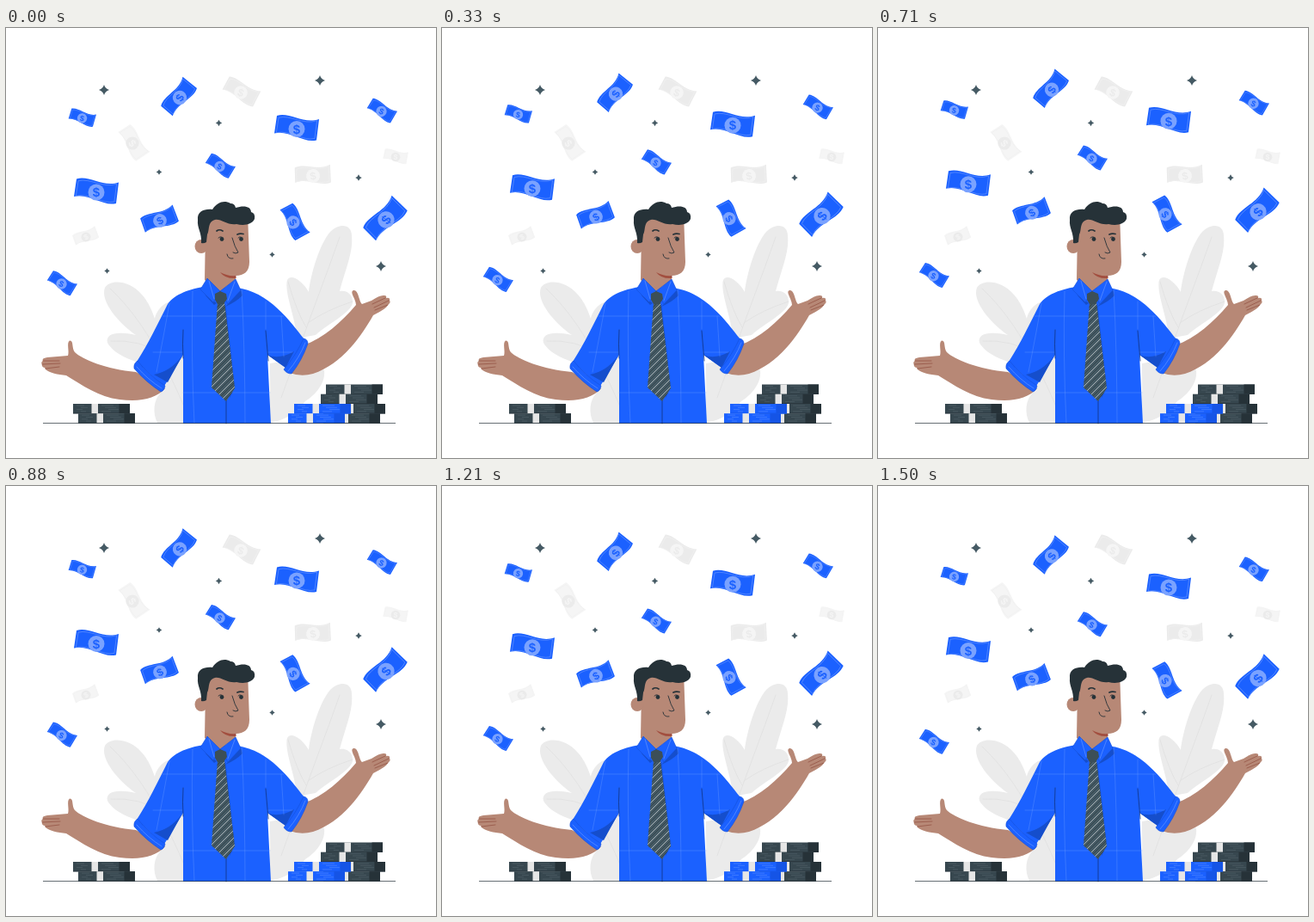
An HTML page that plays this animation: 500x500 px, repeating every 1.54 s.

```html
<!DOCTYPE html>
<html lang="en">
<head>
<meta charset="utf-8">
<title>Money rain</title>
<style>
html, body { margin: 0; width: 100%; height: 100%; overflow: hidden; background: #fff; }
svg { display: block; width: 100vw; height: 100vh; }
text { font: 700 15px "Liberation Sans", Arial, sans-serif; text-anchor: middle; }
.line { fill: none; stroke-linecap: round; stroke-linejoin: round; }
</style>
</head>
<body>
<svg viewBox="0 0 500 500">
  <g fill="#ebebeb">
    <path d="M338 361C338 340 323 308 327 293C331 285 345 294 352 307C354 288 364 252 377 237C387 227 402 227 402 242C404 260 395 280 388 306C397 304 404 311 403 320C400 332 374 344 360 357Z"/>
    <path d="M307 459V390L345 384L370 398C372 414 358 428 348 434C338 447 325 456 307 459Z"/>
    <path d="M207 459H176C170 447 172 433 179 425L150 401L171 393C153 390 126 381 118 366C115 355 130 352 151 357C132 344 109 318 115 302C121 291 145 294 157 309C166 318 171 332 173 338C175 328 184 318 194 318L215 400Z"/>
  </g>
  <g class="line" stroke="#e0e0e0" stroke-width=".8">
    <path d="M388 243C373 286 352 340 320 430M328 295Q338 330 349 348M403 318Q372 328 351 343"/>
    <path d="M121 303C150 330 177 370 207 440M122 364Q155 362 183 379M187 326Q177 342 175 359"/>
  </g>
  <g id="pale"></g>
  <g id="stars" fill="#455a64"></g>
  <g id="bills"></g>

  <g fill="#b78876">
    <path d="M185 419C174 431 157 435 132 432C108 429 88 415 70 404C60 403 51 401 46 397L45 395Q41 394 42 391Q40 389 43 387Q41 384 48 383L72 381C74 376 70 366 74 363.500C79 363 76 372 80 377C88 385 117 397 151 400Z"/>
    <path d="M346 369C370 360 390 342 407 322C407 315 399 307 404 305C410 304 410 317 414 321L425 317Q435 310 440 311Q443 311 442 314Q447 313 446 317Q448 319 444 322Q443 326 427 334C414 357 391 391 357 402Q343 406 330 401Z"/>
  </g>
  <g class="line" stroke="#995b4b" stroke-width=".9">
    <path d="M43 387L62 387M42 391L63 390M46 396L62 394M426 321L441 314M428 325L445 317M429 328L444 322"/>
  </g>

  <path fill="#1b61ff" d="M230 301C211 304 193 311 187 323C177 343 165 368 152 388L183 418L206 380L206 460H308L304 380L328 397L347 362C330 341 306 306 267 302Z"/>
  <g fill="#154ecc">
    <path d="M172 403Q192 399 205 381L188 412Z"/>
    <path d="M304 380Q317 386 335 376L325 395Z"/>
    <path d="M258 321L273 304L275 311Q267 319 255 324ZM231 310L245 320L242 322Z"/>
  </g>
  <path class="line" stroke="#6f9cff" stroke-width=".6" opacity=".6" d="M182 335H323M171 377H205M304 377H333M206 424H307M217 306Q215 380 219 460M274 303Q278 380 278 460M302 318V350M190 320Q184 355 175 400M320 335L323 382"/>
  <path class="line" stroke="#12347f" stroke-width=".8" d="M206 351Q205 368 206 384M302 352L305 387M256 430V460"/>
  <g fill="#1b61ff" stroke="#1550d8" stroke-width=".6">
    <path d="M153 387Q148 390 149 396Q163 412 180 423Q184 422 185 416Q166 404 153 387Z"/>
    <path d="M346 361Q351 362 351 367Q344 387 332 402Q326 402 323 397Q337 381 346 361Z"/>
  </g>
  <path class="line" stroke="#6f9cff" stroke-width=".6" d="M152 394Q165 409 181 419M348 366Q341 384 328 399"/>

  <path fill="#b78876" d="M232 235L231 293L249 306L267 293V288C277 288 283 283 283 272L281 215H238Z"/>
  <ellipse cx="227" cy="254" rx="7.500" ry="8" fill="#b78876"/>
  <path fill="#a24e3f" d="M249 284Q258 289 267.500 288V291Q255 292 249 284Z"/>
  <path fill="#263238" d="M227 250C228 238 222 233 223 223C222 213 231 210 240 211C246 202 254 200 261 204Q266 204 267 209C276 206 285 207 285 214Q290 215 289 222C286 229 276 230 268 228C258 230 249 221 243 223C234 225 237 236 234 240L233 249Q230 251 227 250Z"/>
  <g fill="#263238"><circle cx="251" cy="245.500" r="2.400"/><circle cx="273.500" cy="245.500" r="2.400"/></g>
  <g class="line" stroke="#263238">
    <path stroke-width="1.700" d="M245 236Q248 233.500 252 236M269 240Q272 238.500 276 239.500"/>
    <path stroke-width=".9" d="M247 244Q249 242 251 243M270 244Q271 242.500 273 243M263 244Q266 255 270 261Q267 263 264 261M257 263Q258 269 264 268"/>
  </g>

  <path fill="#154ecc" d="M255 320L266 418L260 430L250 340Z"/>
  <g fill="#1b61ff" stroke="#1550d8" stroke-width=".6">
    <path d="M234 291L226 304L241 319L249 306Z"/>
    <path d="M267 292L273 305L258 321L249 306Z"/>
  </g>
  <path class="line" stroke="#6f9cff" stroke-width=".6" d="M236 294L242 315M266 295L258 317"/>
  <clipPath id="blade"><path d="M246 319L254 319L266 419L256 434L239 418Z"/></clipPath>
  <g clip-path="url(#blade)">
    <rect x="235" y="315" width="35" height="120" fill="#455a64"/>
    <g id="stripes"></g>
  </g>
  <path fill="#3c4f58" d="M243 309L249 306L256 309L257 315L253 321H246L243 316Z"/>

  <g id="stacks"></g>
  <path stroke="#263238" stroke-width=".7" d="M43 459.500H453"/>
</svg>
<script>
const $ = id => document.getElementById(id);
const fill = (id, parts) => { $(id).innerHTML = parts.join(''); };

// Bills: x, y of the coin, turn in degrees, size
const BLUE = [
  [88.5, 105, 9, 0.6], [202, 81, -58, 0.86], [338, 117.5, 0, 1],
  [436.5, 97, 23, 0.65], [248.5, 161, 24, 0.65], [105, 191, 0, 1],
  [179, 224, -28, 0.83], [334, 226, 54, 0.8], [442, 223, -53, 1.02],
  [64.5, 297.5, 24, 0.65]
];
const GREY = [[273, 75, 20, 0.82], [357, 172, -10, 0.84]];
const FAINT = [[147, 134, 49, 0.8], [453, 150, 3, 0.56], [93, 243, -28, 0.58]];
// Sparkles: x, y, radius
const STARS = [
  [114, 72, 6], [365, 61, 6], [436, 277, 6], [247.5, 110.5, 3.7],
  [178, 167.5, 3.3], [410, 174, 3.8], [309.5, 263.5, 3.2], [117.5, 282.5, 3.2]
];
const NOTE = 'M-23-15.500C-8-20 8-5 26-11.500L23 13C8 17-8 1-26 5Z';

const bill = (paper, coin, edge) => ([x, y, turn, size]) =>
  `<g transform="translate(${x} ${y}) rotate(${turn}) scale(${size})">
    <path d="${NOTE}" fill="${paper}"/>
    <path d="${NOTE}" transform="scale(.91 .85)" fill="none" stroke="${edge}" stroke-width=".7"/>
    <circle r="9.500" fill="${coin}"/>
    <text y="5.300" fill="${paper}">$</text></g>`;

function star([x, y, r]) {
  const k = r * 0.23;
  return `<path transform="translate(${x} ${y})" d="M0 ${-r}Q${k} ${-k} ${r} 0` +
    `Q${k} ${k} 0 ${r}Q${-k} ${k} ${-r} 0Q${-k} ${-k} 0 ${-r}Z"/>`;
}

const DARK = ['#37474f', '#263238', '#607078'];
const BRIGHT = ['#1b61ff', '#1554e6', '#6f9cff'];

function bundle(x, y, [front, side, line]) {
  let lines = '';
  for (let i = 0; i < 4; i++) {
    const ly = 2 + i * 2.3;
    lines += `M${4 + i % 2 * 5} ${ly}h${9 - i}M${33 + i % 3 * 4} ${ly}h${14 - i}`;
  }
  return `<g transform="translate(${x} ${y})">
    <rect width="66" height="11.300" fill="${front}"/>
    <rect x="53.500" width="12.500" height="11.300" fill="${side}"/>
    <path d="M0 11H66" stroke="${side}" stroke-width=".8"/>
    <path d="${lines}" stroke="${line}" stroke-width=".4"/>
    <rect x="21.500" width="7.500" height="11.300" fill="#e6e6e6"/></g>`;
}

// Two bundles, the lower one shifted sideways
const pile = (x, y, shift, colors) =>
  bundle(x, y, colors) + bundle(x + shift, y + 11.2, colors);

fill('bills', BLUE.map(bill('#1b61ff', '#7aa2ff', '#6c98ff')));
fill('pale', [
  ...GREY.map(bill('#ebebeb', '#f5f5f5', '#f2f2f2')),
  ...FAINT.map(bill('#f5f5f5', '#ebebeb', '#efefef'))
]);
fill('stars', STARS.map(star));
fill('stripes', Array.from({ length: 16 }, (_, i) => {
  const y = 330 + i * 9;
  return `<path d="M236 ${y}l34-34" stroke="#c3cacd" stroke-width=".8"/>
    <path d="M236 ${y + 4}l34-34" stroke="#33444c" stroke-width="1"/>`;
}));
fill('stacks', [
  pile(78, 437, 6, DARK), pile(372, 414.5, -6, DARK),
  pile(375, 437, -6, DARK), pile(335, 437, -7, BRIGHT)
]);

// Linear float up and back, stepped at 24 pictures a second
const LOOP = 1540, STEPS = 37, RISE = 10;

function draw() {
  const t = performance.now() % LOOP;
  const step = Math.min(STEPS - 1, Math.floor((t + 4.9) * 24 / 1000));
  const y = RISE * (Math.abs(1 - 2 * (step + 1) / STEPS) - 0.95);
  $('bills').setAttribute('transform', `translate(0 ${y.toFixed(3)})`);
  requestAnimationFrame(draw);
}
draw();
</script>
</body>
</html>
```
